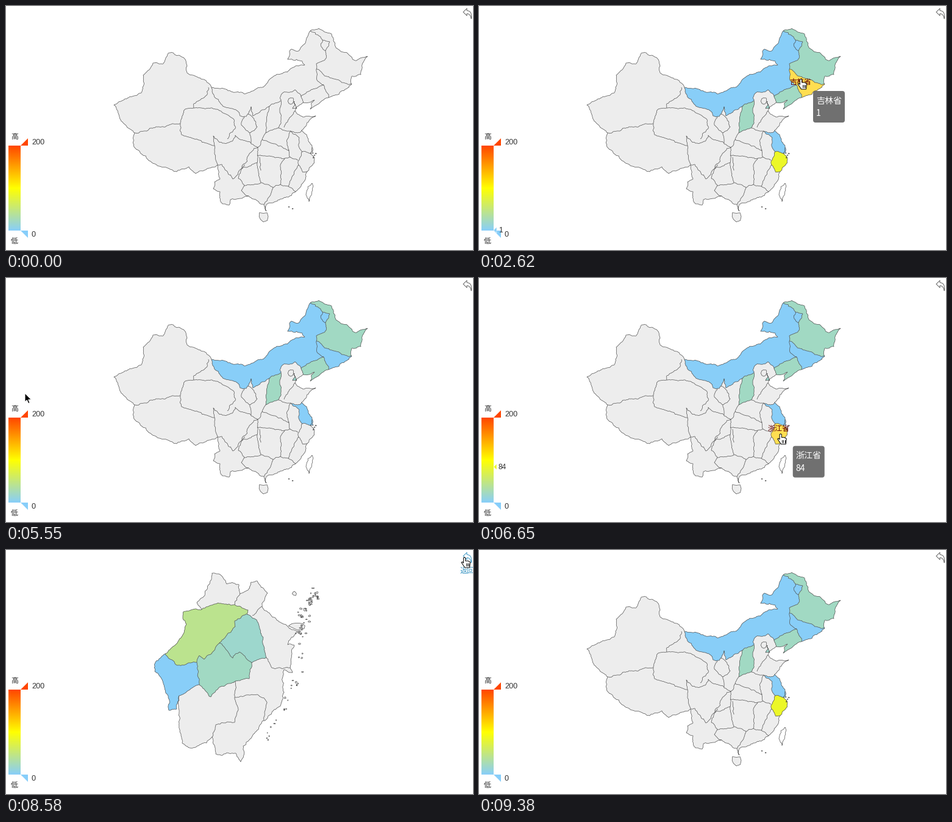
Recreate the animation shown at these times as a matplotlib script. Size 766 by 402 pixels, loop 9.74 s.

```python
import numpy as np
import matplotlib.pyplot as plt
from matplotlib.animation import FuncAnimation
from matplotlib.collections import LineCollection, PolyCollection
from matplotlib.colors import to_hex
from matplotlib.patches import FancyBboxPatch, Polygon, Rectangle
from matplotlib.path import Path
from matplotlib.transforms import Affine2D

W, H, DPI = 766, 402, 64
PT = 72 / DPI
LOOP, STEP = 9740, 20
CJK, SANS = 'Noto Sans CJK JP', 'Liberation Sans'
LAND, EDGE, HOVER, BLUE = '#ededed', '#444444', '#ffde51', '#3e98c5'
rng = np.random.default_rng(7)

fig = plt.figure(figsize=(W / DPI, H / DPI), dpi=DPI, facecolor='white')
ax = fig.add_axes([0, 0, 1, 1])
ax.set(xlim=(0, W), ylim=(H, 0))
ax.axis('off')


def split(a, b):
    """Fractal midpoint displacement between two points."""
    d = np.hypot(*(b - a))
    if d < 3:
        return [b]
    m = (a + b) / 2 + rng.normal(0, min(0.09 * d, 1), 2)
    return split(a, m) + split(m, b)


def rough(flat):
    p = np.reshape(flat, (-1, 2)).astype(float)
    out = [p[0]]
    for a, b in zip(p[:-1], p[1:]):
        out += split(a, b)
    return np.array(out)


def bend(a, b, c, s):
    """Quadratic curve from a to c, pulled towards b."""
    a, b, c = map(np.array, (a, b, c))
    s = np.reshape(s, (-1, 1))
    return (1 - s) ** 2 * a + 2 * s * (1 - s) * b + s ** 2 * c


def islet(x, y, rx, ry):
    a = np.linspace(0, 2 * np.pi, 9)
    r = rng.uniform(0.7, 1.2, 9)
    r[-1] = r[0]
    return np.c_[x + rx * r * np.cos(a), y + ry * r * np.sin(a)]


def archipelago(a, b, c, n, spread, size):
    mid = bend(a, b, c, rng.uniform(0, 1, n)) + rng.normal(0, spread, (n, 2))
    return [islet(x, y, *rng.uniform(0.4, size, 2)) for x, y in mid]


def ramp(v):
    stops = np.array([[135, 206, 250], [255, 255, 0], [255, 69, 0]]) / 255
    return to_hex([np.interp(v, [0, 100, 200], stops[:, k]) for k in range(3)])


def join(arcs, names):
    return np.vstack([arcs[n[1:]][::-1] if n[0] == '-' else arcs[n]
                      for n in names.split()])


class Region:
    def __init__(self, pts, name, value, label, trans):
        self.name, self.value, self.label = name, value, label
        self.path = Path(pts)
        self.patch = ax.add_patch(Polygon(pts, fc=ramp(value), ec='none', transform=trans))

    def paint(self, hover, active):
        fill = ramp(self.value) if active else LAND
        self.patch.set_facecolor(HOVER if hover else fill)


class AreaMap:
    """Borders are shared key points; '-' in a region's path walks one backwards."""

    def __init__(self, borders, outline, isles, regions):
        self.shift = Affine2D()
        trans = self.shift + ax.transData
        arcs = {k: rough(v) for k, v in borders.items()}
        land = PolyCollection([join(arcs, outline)] + isles, fc=LAND, ec='none',
                              transform=trans)
        ax.add_collection(land, autolim=False)
        self.regions = [Region(join(arcs, names), name, value, (x, y), trans)
                        for names, name, value, x, y in regions]
        lines = LineCollection(list(arcs.values()) + isles, colors=EDGE,
                               linewidths=0.65 * PT, transform=trans, zorder=3)
        ax.add_collection(lines, autolim=False)
        self.artists = [land, lines] + [r.patch for r in self.regions]

    def show(self, on):
        for a in self.artists:
            a.set_visible(on)

    def at(self, xy):
        return next((r for r in self.regions if r.path.contains_point(xy)), None)


nation = AreaMap(
    dict(
        # outer border
        nm=[337, 134, 391, 145, 425, 131, 440, 115, 472, 101, 490, 97, 486, 91, 462, 88,
            468, 71, 480, 74, 492, 57, 499, 41],
        hl=[499, 41, 513, 37, 532, 45, 543, 70, 562, 80, 571, 89, 593, 83, 584, 97,
            582, 113, 567, 116, 567, 129],
        jl=[567, 129, 557, 137, 545, 146, 529, 151],
        ln=[529, 151, 499, 170, 506, 155, 488, 159],
        bo=[488, 159, 474, 173, 487, 183, 508, 181, 494, 192, 485, 205],
        js=[485, 205, 493, 212, 502, 233],
        sh=[502, 233, 504, 243, 499, 243],
        zj=[499, 243, 506, 251, 503, 262, 494, 273],
        xj=[337, 134, 325, 121, 297, 110, 294, 88, 274, 77, 266, 78, 258, 95, 241, 94,
            235, 105, 225, 114, 222, 143, 202, 150, 177, 163, 187, 186, 211, 209],
        xz=[211, 209, 210, 232, 244, 260, 280, 273, 300, 265, 311, 276, 347, 262],
        yn=[347, 262, 351, 285, 342, 290, 340, 301, 351, 306, 355, 326, 366, 328,
            368, 319, 398, 313],
        so=[398, 313, 423, 327, 427, 338, 427, 327, 450, 318, 475, 306, 489, 289, 494, 273],
        # borders of the coloured regions
        nm_hl=[499, 41, 519, 56, 531, 59, 524, 74, 524, 87, 509, 95, 509, 104],
        patch=[519, 56, 517, 67, 524, 74],
        hl_jl=[567, 129, 546, 122, 526, 116, 509, 104],
        nm_jl=[509, 104, 510, 122, 521, 130],
        jl_ln=[521, 130, 529, 151],
        nm_ln=[521, 130, 498, 140, 484, 149],
        ln_he=[484, 149, 488, 159],
        nm_he=[484, 149, 474, 138, 453, 144, 451, 156],
        nm_sx=[451, 156, 432, 165],
        nm_w=[432, 165, 405, 181, 402, 166, 394, 182, 384, 181, 380, 173, 358, 166,
              342, 150, 337, 134],
        sx_e=[451, 156, 449, 169, 451, 183, 447, 201],
        sx_s=[447, 201, 426, 209],
        sx_w=[426, 209, 429, 176, 432, 165],
        tj=[473, 157, 470, 169, 477, 169, 473, 157],
        js_sd=[485, 205, 478, 209, 467, 206],
        js_w=[467, 206, 481, 217, 480, 231, 486, 240],
        js_zj=[486, 240, 499, 243],
        js_sh=[502, 233, 499, 243],
        zj_w=[494, 273, 487, 274, 479, 256, 486, 240],
        # other inner borders
        xj_e=[332, 134, 330, 146, 308, 161, 308, 168, 292, 172, 286, 194],
        xj_s=[286, 194, 246, 199, 211, 209],
        gs=[308, 168, 346, 170, 374, 187, 376, 202, 363, 219],
        gs_e=[391, 182, 386, 196, 400, 209, 402, 226],
        qh=[286, 194, 288, 212, 342, 230, 340, 214, 355, 226, 371, 223],
        xz_e=[342, 230, 347, 262],
        sc_n=[371, 223, 376, 213, 413, 233],
        sc_s=[347, 262, 354, 261, 372, 285, 391, 261],
        gz_w=[387, 268, 381, 284, 391, 296, 386, 304, 398, 313],
        gz=[387, 268, 412, 258, 418, 291, 391, 296],
        cq=[387, 268, 397, 247, 413, 233, 412, 258],
        nx=[397, 178, 407, 186, 412, 199, 400, 209],
        sn_e=[426, 209, 418, 224, 413, 233],
        ha_n=[447, 201, 467, 206],
        ha_s=[420, 220, 447, 231, 465, 238],
        ha_e=[467, 206, 461, 227, 466, 249],
        hb_s=[412, 246, 457, 251, 479, 254],
        hn_w=[416, 249, 418, 271],
        hn_s=[418, 291, 438, 299, 450, 294],
        jx_w=[457, 251, 450, 262, 450, 294, 463, 297],
        jx_e=[480, 262, 463, 297, 475, 306],
        gd=[438, 299, 434, 311, 423, 327],
        sd_w=[474, 173, 456, 200],
        tw=[502, 292, 504, 297, 497, 322, 492, 311, 495, 298, 502, 292]),
    'nm hl jl ln bo js sh zj -so -yn -xz -xj',
    [islet(422, 347, 8, 8), islet(467, 157, 5, 6), islet(464, 331, 1, 0.7),
     islet(470, 334, 1, 0.7)] + archipelago((508, 243), (506, 247), (505, 251), 3, 1, 1.3),
    [('nm nm_hl nm_jl nm_ln nm_he nm_sx nm_w', '内蒙古自治区', 1, 435, 152),
     ('hl hl_jl -nm_hl', '黑龙江省', 22, 537, 107),
     ('jl -jl_ln -nm_jl -hl_jl', '吉林省', 1, 527, 124),
     ('ln -ln_he -nm_ln jl_ln', '辽宁省', 22, 514, 145),
     ('sx_e sx_s sx_w -nm_sx', '山西省', 22, 440, 182),
     ('tj', '天津市', 18, 473, 165),
     ('js js_sh -js_zj -js_w -js_sd', '江苏省', 1, 484, 231),
     ('sh -js_sh', '上海市', 1, 502, 238),
     ('zj zj_w js_zj', '浙江省', 84, 492, 247)])

detail = AreaMap(
    dict(
        # outer border
        hu=[322, 98, 314, 87, 327, 75, 339, 38, 353, 41, 363, 56, 383, 57, 385, 72],
        jx=[385, 72, 398, 66, 403, 53, 413, 51, 430, 71, 421, 93],
        nb=[421, 93, 456, 122, 479, 134, 463, 156, 474, 157, 467, 194],
        tz=[467, 194, 471, 202, 457, 197, 455, 239, 451, 257, 424, 281],
        wz=[424, 281, 417, 289, 390, 323, 392, 334, 386, 349, 378, 335, 345, 336, 339, 308],
        ls=[339, 308, 330, 318, 302, 326, 290, 318, 285, 285, 285, 240],
        qz=[285, 240, 281, 262, 268, 264, 267, 243, 256, 212, 245, 200, 246, 185, 262, 171],
        hz=[262, 171, 286, 146, 297, 122, 291, 110, 294, 101, 322, 98],
        # inner borders
        hz_hu=[322, 98, 343, 89, 376, 90],
        hu_jx=[385, 72, 376, 90],
        hz_jx=[376, 90, 398, 99, 397, 106],
        jx_s=[421, 93, 405, 108],
        hz_sx=[397, 106, 376, 117, 377, 126, 351, 153],
        hz_jh=[351, 153, 341, 167, 326, 180, 318, 174, 314, 185],
        hz_qz=[314, 185, 282, 190, 262, 171],
        sx_jh=[351, 153, 373, 178, 384, 168, 404, 186],
        sx_nb=[397, 106, 412, 115, 420, 140, 428, 177],
        sx_tz=[428, 177, 404, 186],
        jh_tz=[404, 186, 400, 212, 377, 216],
        jh_ls=[377, 216, 351, 226, 337, 242, 318, 222],
        jh_qz=[318, 222, 314, 185],
        qz_ls=[318, 222, 285, 240],
        nb_tz=[428, 177, 437, 194, 467, 194],
        tz_ls=[377, 216, 376, 243],
        tz_wz=[376, 243, 413, 238, 427, 248, 424, 281],
        ls_wz=[376, 243, 382, 262, 376, 284, 345, 288, 339, 308]),
    'hu jx nb tz wz ls qz hz',
    [islet(479, 125, 14, 6), islet(474, 72, 3, 4)]
    + archipelago((514, 66), (486, 98), (484, 148), 48, 5, 2.4)
    + archipelago((486, 168), (472, 255), (416, 322), 24, 3, 1.9),
    [('hz hz_hu hz_jx hz_sx hz_jh hz_qz', '杭州市', 43, 330, 135),
     ('sx_nb sx_tz -sx_jh -hz_sx', '绍兴市', 18, 396, 146),
     ('sx_jh jh_tz jh_ls jh_qz -hz_jh', '金华市', 22, 358, 200),
     ('qz -hz_qz -jh_qz qz_ls', '衢州市', 1, 284, 210)])


def write(x, y, s, px, font=CJK, color='#333333', ha='left', z=6):
    return ax.text(x, y + 1, s, fontsize=px * PT, family=font, color=color,
                   ha=ha, va='center', zorder=z)


def poly(pts, fc, ec='none', lw=0, z=5):
    return ax.add_patch(Polygon(pts, fc=fc, ec=ec, lw=lw * PT, zorder=z, joinstyle='round'))


# colour scale
TOP, BOTTOM = 230, 370
bands = [[(4, y), (24, y), (24, y + 1), (4, y + 1)] for y in range(TOP, BOTTOM)]
ax.add_collection(PolyCollection(
    bands, fc=[ramp((BOTTOM - y - 0.5) / 0.7) for y in range(TOP, BOTTOM)],
    ec='none', antialiased=False), autolim=False)
shade = ax.add_patch(Rectangle((4, TOP), 20, 0, fc='#aaaaaa', ec='none', zorder=2))
handle = poly([(24, TOP), (36, TOP), (36, TOP - 12)], ramp(200))
poly([(24, BOTTOM), (36, BOTTOM), (36, BOTTOM + 12)], ramp(0))
high = write(42, TOP - 6, '200', 12.6, SANS)
write(42, BOTTOM + 6, '0', 12.6, SANS)
write(14, 214, '高', 12, ha='center')
write(14, 386, '低', 12, ha='center')
mark = poly([(24, 0), (29, -5), (29, 5)], ramp(0), 'white', 0.5)
mark_text = write(32, 0, '', 12, SANS)

# return button
s = np.linspace(0, 1, 9)
tail = np.vstack([bend((756, 7.6), (765, 8), (763.2, 21), s),
                  bend((763.2, 21), (762, 13), (756, 12.6), s)])
arrow = poly(np.vstack([[(750, 10), (756, 4)], tail, [(756, 16)]]), 'none', '#666666', 1)
back = write(757, 33, '返回', 12, color=BLUE, ha='center')

# hover label and tooltip
label = write(0, 0, '', 12, color='#640000', ha='center', z=4)
tip = ax.add_patch(FancyBboxPatch((0, 0), 52, 52, fc=(.2, .2, .2, .7), ec='none',
                                  boxstyle='round,pad=0,rounding_size=4', zorder=7))
tip_name = write(0, 0, '', 14, color='white', z=8)
tip_value = write(0, 0, '', 14, color='white', z=8)

# cursors, tip at the zero point
POINTER = np.array([(0, 0), (0, 14.5), (3.3, 11.5), (5.7, 17), (8, 16), (5.8, 10.8),
                    (10.4, 10.6)])
HAND = np.array([(-1.6, 1), (0, 0), (1.6, 1), (1.6, 6), (6, 6), (9.5, 8), (8.5, 17),
                 (0.6, 17), (-5, 8.5), (-3.5, 7.5), (-1.6, 9.3)])
half = np.array([(0, -7), (4, -2.5), (1, -2.5), (1, 2.5), (4, 2.5), (0, 7)])
RESIZE = np.vstack([half, half[::-1] * (-1, 1)])
KNUCKLES = np.array([[(x, 10), (x, 14), (np.nan, np.nan)] for x in (2.5, 4.7, 6.9)])
KNUCKLES = KNUCKLES.reshape(-1, 2)
cursor = poly(POINTER, 'black', 'white', 1, 10)
fingers, = ax.plot([], [], color='black', lw=0.9 * PT, zorder=11)

# start, end, x, y of each cursor move
MOVES = [(1760, 2230, 741, 40), (2230, 2600, 528, 120), (2760, 3080, 290, 295),
         (3240, 3780, 33, 237), (4080, 4730, 33, 348), (5090, 5140, 33, 342),
         (5300, 5550, 31, 189), (5550, 5670, 31, 175), (5850, 6600, 496, 255),
         (6600, 6770, 487, 267), (7180, 7390, 556, 196), (7420, 7650, 380, 195),
         (7650, 8090, 470, 160), (8180, 8540, 752, 12), (8750, 9380, 722, 401)]


def cursor_at(t):
    p = np.array([279.0, 322.0])
    for t0, t1, x, y in MOVES:
        k = np.clip((t - t0) / (t1 - t0), 0, 1)
        p += (np.array([x, y]) - p) * k * k * (3 - 2 * k)
    return p


def draw_scale(t, y):
    top = float(np.clip(y - 7, TOP, BOTTOM)) if 4080 < t < 5550 else TOP
    value = (BOTTOM - top) / 0.7
    shade.set_height(top - TOP)
    handle.set_xy([(24, top), (36, top), (36, top - 12)])
    handle.set_facecolor(ramp(value))
    high.set_text(f'{value:.0f}')
    high.set_y(top - 5)


def draw_hover(region, x, y, tip_on):
    on = region is not None
    for a in (label, mark, mark_text):
        a.set_visible(on)
    for a in (tip, tip_name, tip_value):
        a.set_visible(on and tip_on)
    if not on:
        return
    lx, ly = region.label
    label.set_text(region.name)
    label.set_position((lx, ly + 1))
    my = BOTTOM - region.value * 0.7
    mark.set_xy([(24, my), (29, my - 5), (29, my + 5)])
    mark.set_facecolor(ramp(region.value))
    mark_text.set_text(str(region.value))
    mark_text.set_y(my + 1)
    tx, ty = x + 20, y + 20
    tip.set_bounds(tx, ty, 14 * len(region.name) + 10, 52)
    tip_name.set_text(region.name)
    tip_name.set_position((tx + 5, ty + 16.5))
    tip_value.set_text(str(region.value))
    tip_value.set_position((tx + 5, ty + 37))


def draw_cursor(t, pos, hand):
    shown = 1440 <= t <= 9380
    cursor.set_visible(shown)
    fingers.set_visible(shown and hand)
    resize = 3760 <= t < 5550 and pos[1] > 220
    shape = RESIZE if resize else HAND if hand else POINTER
    cursor.set_xy(shape + pos)
    cursor.set_facecolor('white' if hand else 'black')
    cursor.set_edgecolor('black' if hand else 'white')
    fingers.set_data(*(KNUCKLES + pos).T)


def update(i):
    t = i * STEP
    pos = cursor_at(t)
    x, y = pos
    drilled = 7180 <= t < 8750
    view = detail if drilled else nation
    nation.show(not drilled)
    detail.show(drilled)
    detail.shift.clear().translate(-1 if t >= 7600 else 0, 0)

    hover = view.at(pos) if t >= 1440 else None
    for r in view.regions:
        filtered = r.value == 84 and 4500 <= t < 5850
        r.paint(r is hover, t >= 1440 and not filtered)

    over = 8480 <= t < 8780 and x > 744 and y < 24
    arrow.set_edgecolor(BLUE if over else '#666666')
    back.set_visible(over)
    draw_scale(t, y)
    draw_hover(hover, x, y, not 6880 <= t < 7180)
    draw_cursor(t, pos, hover is not None or over)
    return []


anim = FuncAnimation(fig, update, frames=LOOP // STEP, interval=STEP, repeat=True,
                     repeat_delay=0, blit=False)
plt.show()
```
